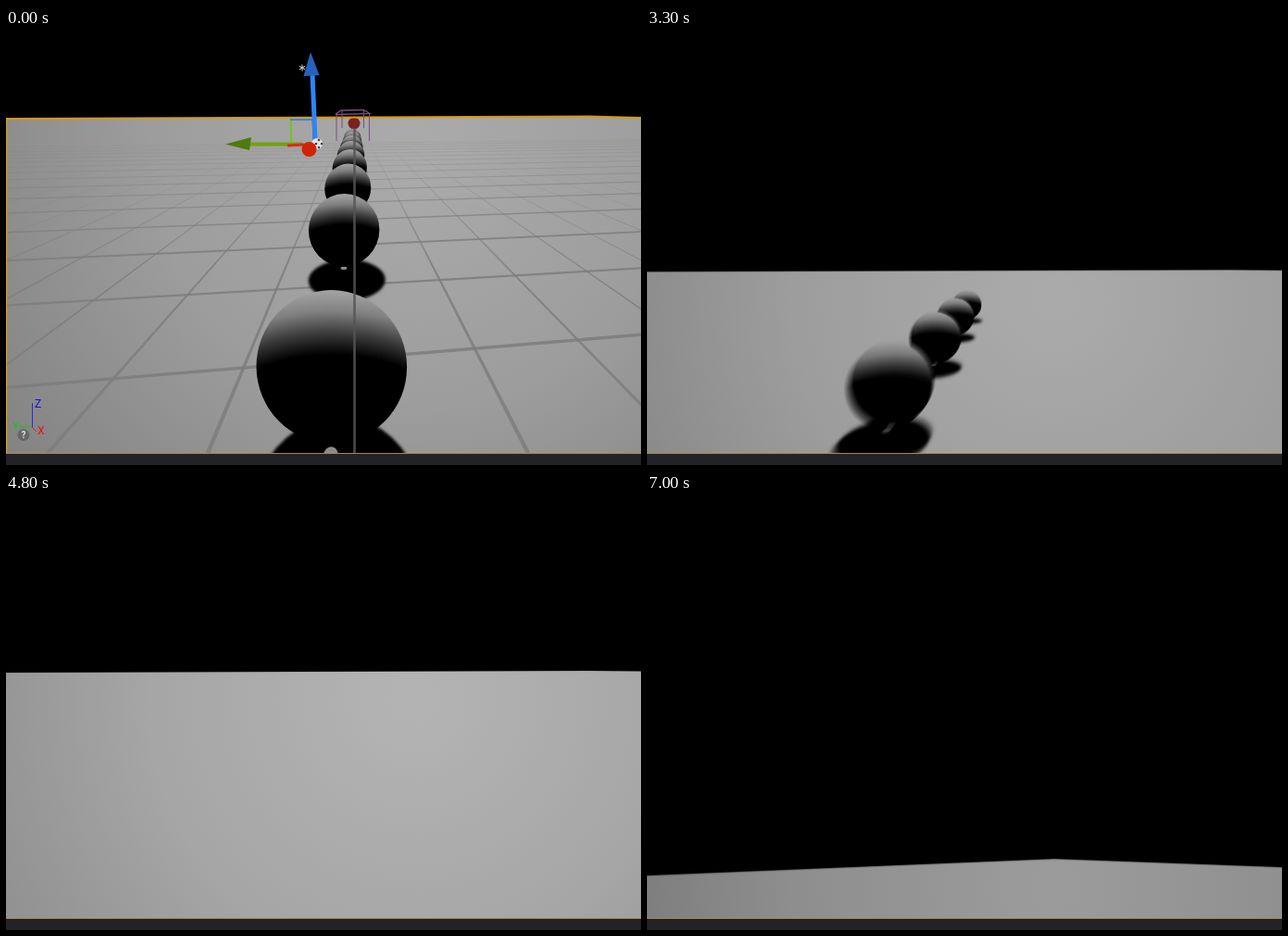
An HTML page with a canvas that plays this animation: 686x472 px, repeating every 7100 ms.

```html
<!DOCTYPE html>
<html lang="en">
<head>
<meta charset="utf-8">
<title>Row of spheres</title>
<style>
  html, body { margin: 0; width: 100%; height: 100%; overflow: hidden; background: #000; }
  canvas { display: block; }
</style>
</head>
<body>
<canvas id="stage" width="686" height="472"></canvas>
<script>
const W = 686, H = 472, FLOOR_END = 459;
const LOOP = 7100, TICK = 100, PLAY = 1800, SWAP = 5000, AWAY = 6200;
const FOCAL = 343, RADIUS = 1 / FOCAL, FLOOR_LENGTH = 0.48;
const SPEED = 0.044, SHUTTER = 26, SAMPLES = 12;
const screen = document.getElementById('stage').getContext('2d');
const layer = document.createElement('canvas');
layer.width = W;
layer.height = H;
const g = layer.getContext('2d');

const row = (count, first, step) => Array.from({ length: count }, (_, i) => first + step * i);
const blackRow = row(8, 0.0123, 0.0139);
const redRow = row(3, 0.1524, 0.0106);

// Time and screen height of the far floor edge as the view tilts.
const TILT = [[2000, 97], [3300, 263], [4150, 187], [4900, 194], [5300, 214], [5700, 214], [6100, 486], [7000, 395]];

const clamp = (x, lo = 0, hi = 1) => Math.min(hi, Math.max(lo, x));
const bump = (x, centre, width) => Math.exp(-(((x - centre) / width) ** 2));
const grey = v => `rgb(${v},${v},${v})`;

function along(path, t) {
  const time = clamp(t, path[0][0], path.at(-1)[0]);
  const i = Math.max(1, path.findIndex(p => p[0] >= time));
  const [t0, v0] = path[i - 1], [t1, v1] = path[i];
  return v0 + (v1 - v0) * (time - t0) / (t1 - t0);
}

// Run up to speed, drift sideways, jump once around 2.5 s.
function cameraAt(t) {
  const s = Math.max(0, t - PLAY) / 1000, ramp = clamp((s - 0.2) / 0.533);
  const travel = SPEED * (0.2665 * ramp * ramp + Math.max(0, s - 0.733));
  const height = 2.58 + 0.84 * (1 - ramp) + 1.42 * bump(s, 2.5, 0.85);
  const edge = along(TILT, t);
  return {
    travel, height, edge,
    horizon: edge - (height + 1) / (FLOOR_LENGTH - travel),
    side: -0.31 - 62 * travel + 145 * travel * travel,
    vx: 377 + 280 * travel,
    light: t < PLAY ? 170 : 148 + 32 * bump(s, 2.7, 2)
  };
}

function shape(points, fill) {
  g.beginPath();
  points.forEach(([x, y]) => g.lineTo(x, y));
  g.closePath();
  g.fillStyle = fill;
  g.fill();
}

function line(points, color, width = 1) {
  g.beginPath();
  points.forEach(([x, y]) => g.lineTo(x, y));
  g.strokeStyle = color;
  g.lineWidth = width;
  g.stroke();
}

function dot(x, y, r, color) {
  g.beginPath();
  g.arc(x, y, r, 0, 7);
  g.fillStyle = color;
  g.fill();
}

function gradient(fade, colors) {
  colors.forEach((color, i) => fade.addColorStop(i / (colors.length - 1), color));
  return fade;
}

function floor({ edge, light }, tick) {
  const top = tick > AWAY ? [[0, edge + 18], [440, edge], [W, edge + 9]]
    : [[0, edge + 1], [630, edge - 1], [W, edge - 0.5]];
  const glow = g.createRadialGradient(440, edge + 30, 20, 440, edge + 30, 540);
  shape([...top, [W, H], [0, H]],
    gradient(glow, [0, 13, 38].map(dim => grey(Math.round(light - dim)))));
}

function floorGrid() {
  const vx = 374, vy = 87, depth = 372, far = 3620;
  g.save();
  g.beginPath();
  g.rect(0, 98, W, 362);
  g.clip();
  for (let i = -16; i <= 16; i++) {
    const x = 391 + 173 * i;
    const fade = g.createLinearGradient(0, 100, 0, 260);
    shape([[vx, vy], [x - 2.5, vy + depth], [x + 2.5, vy + depth]],
      gradient(fade, ['rgba(125,125,125,0)', 'rgba(125,125,125,.85)']));
  }
  for (let j = 0; j < 16; j++) {
    const drop = FOCAL / (1.27 + 0.53 * j);
    const atX = x => vy + drop * (far - x) / (far - 376);
    line([[0, atX(0)], [W, atX(W)]], `rgba(125,125,125,${clamp(drop / 170, 0.1, 0.85)})`,
      Math.max(0.7, drop / 80));
  }
  g.restore();
}

// A disc lying on the floor, projected point by point.
function floorDisc(cam, z, size, offset, color) {
  const points = row(40, 0, Math.PI / 20).map(a => {
    const r = 1 / Math.max(0.003, z + size * RADIUS * Math.sin(a));
    return [cam.vx + (cam.side + offset + size * Math.cos(a)) * r, cam.horizon + (cam.height + 1) * r];
  });
  shape(points, color);
}

// Wide-angle projection stretches a ball away from the view centre.
function sphere(cam, z, red) {
  const r = 1 / z, x = cam.vx + cam.side * r, y = cam.horizon + cam.height * r;
  const dx = x - W / 2, dy = y - 300, d2 = dx * dx + dy * dy || 1;
  const k = Math.min(0.3, Math.sqrt(1 + d2 / FOCAL ** 2) - 1) / d2;
  const shade = g.createRadialGradient(0, 2.5, 2.66, 0, 2.5, 3.5);
  g.save();
  g.translate(x, y);
  g.transform(1 + k * dx * dx, k * dx * dy, k * dx * dy, 1 + k * dy * dy, 0, 0);
  g.scale(r, r);
  dot(0, 0, 1, gradient(shade, red ? ['#000', '#4c0709', '#8c1014', '#a8161b']
    : ['#000', '#3c3c3c', '#808080', '#a4a4a4']));
  if (red) {
    const shine = g.createRadialGradient(0.15, -0.75, 0, 0.15, -0.75, 0.24);
    dot(0.15, -0.75, 0.24, gradient(shine, ['rgba(225,90,95,.5)', 'rgba(225,90,95,0)']));
  }
  g.restore();
}

function spheres(cam, depths, red) {
  depths.map(d => d - cam.travel).filter(z => z > 0.0045).reverse().forEach(z => {
    g.filter = 'blur(1.5px)';
    floorDisc(cam, z - 0.65 * RADIUS, 1, 0.1, '#000');
    g.filter = 'none';
    floorDisc(cam, z - 0.15 * RADIUS, 0.09, 0, '#8a8a8a');
    sphere(cam, z, red);
  });
}

function gizmo() {
  line([[308, 125], [308, 99]], '#79c31c', 2);
  line([[307, 99], [333, 99]], '#3488ec', 2);
  line([[332, 99], [333, 122]], '#e22a10', 3);
  line([[334, 121], [331, 50]], '#2b86f4', 5);
  shape([[329, 26], [321.5, 52], [338.5, 51]], '#2861bd');
  line([[320, 125.5], [262, 125.5]], '#76a012', 4);
  shape([[237, 125.5], [265, 118], [263, 132]], '#4f7b0c');
  line([[304, 127], [322, 126]], '#e22a10', 3);
  dot(336, 125, 6, '#e4e4e4');
  for (let a = 0; a < 4; a++) dot(338 + 3 * Math.cos(a * 1.57), 125 + 4 * Math.sin(a * 1.57), 1.3, '#444');
  dot(327.5, 131, 8, '#cf2408');
  for (let a = 0.5; a < 3; a += 1.05) {
    const x = 3.5 * Math.cos(a), y = 3.5 * Math.sin(a);
    line([[320 - x, 43 - y], [320 + x, 43 + y]], '#ddd');
  }
}

function label(text, x, y, color, font = '12px') {
  g.font = `${font} Roboto, sans-serif`;
  g.fillStyle = color;
  g.fillText(text, x, y);
}

function axes() {
  line([[28.5, 431], [28.5, 405]], '#2030e0');
  line([[28, 431], [33, 436]], '#e02020');
  line([[28, 431], [14, 430]], '#20c020');
  label('Z', 31, 410, '#1010e8');
  label('X', 34, 439, '#e81010');
  label('Y', 7, 434, '#10c810');
  dot(19, 439.5, 6.5, '#666');
  label('?', 16.5, 443, '#ddd', 'bold 10px');
}

function editorOverlay() {
  const purple = '#75507f', gold = '#dc9a0c';
  line([[376.5, 108], [376.5, FLOOR_END]], 'rgba(85,85,85,.9)', 2.5);
  line([[0, 98], [630, 95.5], [W, 97]], gold, 2);
  line([[0.5, 98], [0.5, FLOOR_END]], gold, 1.5);
  line([[356, 93], [362, 89], [386, 88.5], [393, 92.5], [356, 93.5]], purple, 1.3);
  for (const x of [357, 392.5]) line([[x, 93], [x, 122]], purple);
  for (const x of [363, 386.5]) line([[x, 89], [x, 108]], purple);
  gizmo();
  axes();
}

function edgeGlow(tick) {
  const strength = 0.75 * clamp(1 - (tick - PLAY) / 750);
  const colors = [`rgba(75,190,75,${strength})`, 'rgba(75,190,75,0)'];
  g.fillStyle = gradient(g.createLinearGradient(0, 0, 8, 0), colors);
  g.fillRect(0, 0, 8, 460);
  g.fillStyle = gradient(g.createLinearGradient(0, 460, 0, 451), colors);
  g.fillRect(0, 451, W, 9);
}

function drawScene(t, tick) {
  const cam = cameraAt(t), editing = tick < PLAY;
  g.fillStyle = '#000';
  g.fillRect(0, 0, W, H);
  floor(cam, tick);
  if (editing) {
    floorGrid();
    dot(376, 103, 6.5, '#7c2020');
  }
  if (tick < SWAP) spheres(cam, blackRow, false);
  else if (tick < AWAY) spheres(cam, redRow, true);
  if (editing) editorOverlay();
  g.fillStyle = '#a08a58';
  g.fillRect(0, FLOOR_END, W, 1);
  if (!editing) edgeGlow(tick);
  g.fillStyle = '#232226';
  g.fillRect(0, FLOOR_END + 1, W, 12);
}

let shown = -1;
function render(now) {
  const tick = Math.floor(now % LOOP / TICK) * TICK;
  if (tick !== shown) {
    shown = tick;
    const count = tick > PLAY ? SAMPLES : 1;
    // Averaging moments around the tick gives motion blur.
    for (let i = 0; i < count; i++) {
      const offset = ((i + 0.5) / count - 0.5) * SHUTTER;
      drawScene(tick + offset, tick);
      screen.globalAlpha = 1 / (i + 1);
      screen.drawImage(layer, 0, 0);
    }
  }
  requestAnimationFrame(render);
}
requestAnimationFrame(render);
</script>
</body>
</html>
```
